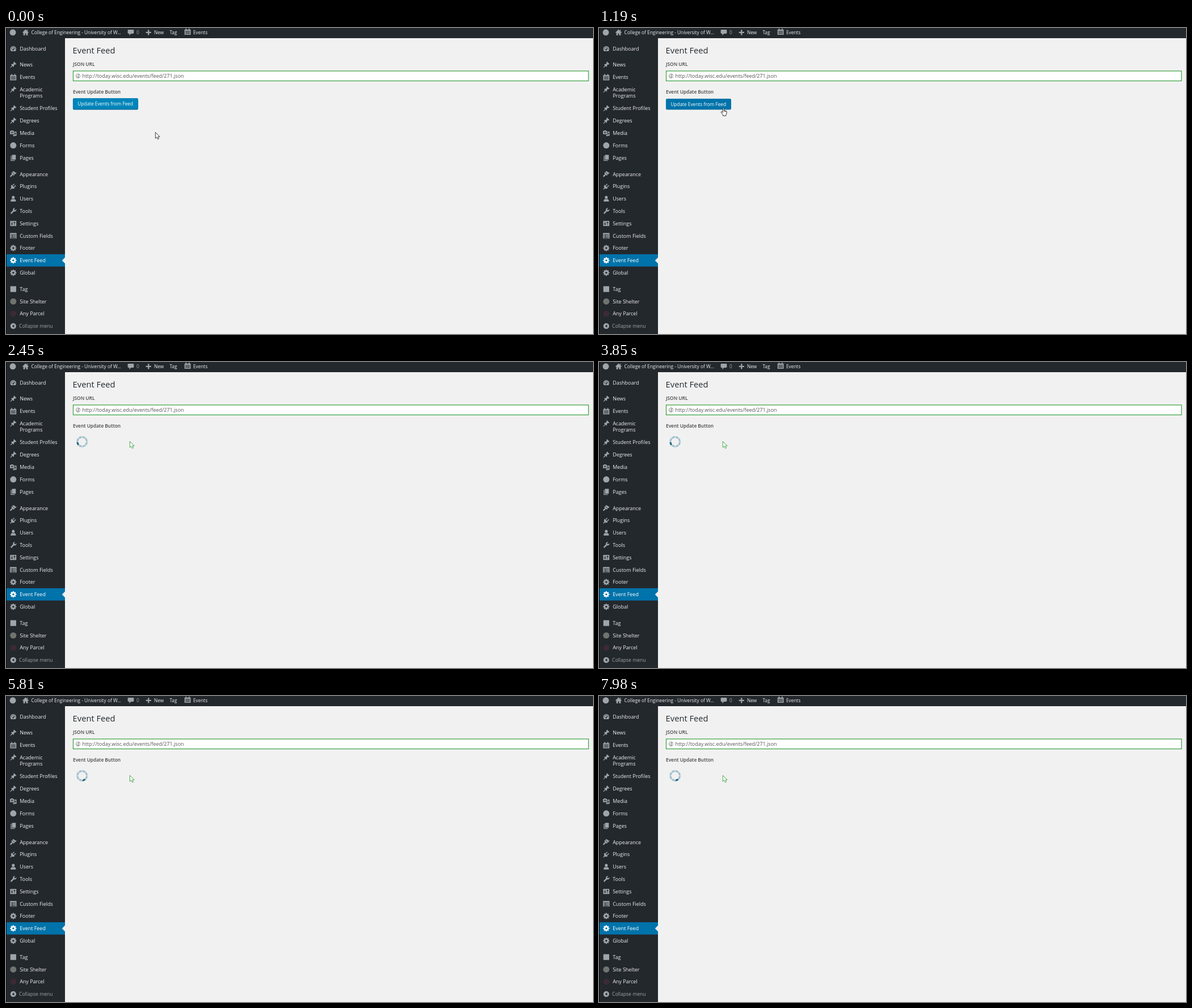
These frames come from a looping animation (1035x541 px, 8 s). An HTML page:

```html
<!DOCTYPE html>
<html lang="en">
<head>
<meta charset="utf-8">
<title>Event Feed</title>
<style>
  html, body { margin: 0; width: 100%; height: 100%; overflow: hidden; background: #f1f1f1; }
  svg { display: block; width: 100vw; height: 100vh; }
  text { font-family: "Open Sans", "Noto Sans", sans-serif; white-space: pre; }
</style>
</head>
<body>
<svg id="stage" viewBox="0 0 1035 541" preserveAspectRatio="none">
  <rect width="1035" height="541" fill="#f1f1f1"/>
  <rect width="104" height="541" fill="#23282d"/>
  <rect width="1035" height="18" fill="#23282d"/>
  <rect width="1" height="541" fill="#0b0d0f"/>
  <rect x="1" y="400" width="103" height="21.7" fill="#0073aa"/>
  <path d="M104 405.8l-5.2 5.2 5.2 5.2z" fill="#f1f1f1"/>
  <g id="bar"></g>
  <g id="menu"></g>
  <g id="form">
    <rect x="118.5" y="76" width="908.5" height="17.5" fill="#fff" stroke="#35a03c" stroke-width="1.2"/>
    <circle cx="127" cy="84.8" r="4.2" fill="#a6a6a6"/>
    <path d="M124.4 82.6l2-1.2 1.2 1-1.4 1.6.6 1.6-1 1.8-1.6-2.4zM128.6 83.4l1.6-.4.4 2.2-1.6 2-.8-1.8z" fill="#f4f4f4"/>
  </g>
  <g id="button">
    <rect id="shadow" x="118" y="125" width="115" height="19.4" rx="2" fill="#006799"/>
    <rect id="face" x="118.4" y="124.9" width="114.2" height="18.6" rx="1.6" stroke-width=".8"/>
  </g>
  <g id="spinner" transform="translate(134.2 141)"></g>
  <path id="arrow" d="M.4.4v10.8l2.5-2.3 1.7 3.8 1.9-.8-1.7-3.7h3.4z" fill="#fff" stroke-width=".9"/>
  <path id="hand" d="M.3 1.6Q1.3-.3 2.4 1.6V5.4L5.6 6Q7.4 6.4 7.2 8.2L6.8 11.4 5.8 12.8V14.6H.6V13.2L-2.6 8.6Q-3 7 -1.4 7.2L.3 8.8zM3.4 7.4V5.8M5.2 7.7V6.2"
    fill="#fff" stroke="#15181b" stroke-width=".9" stroke-linejoin="round"/>
</svg>
<script>
const NS = "http://www.w3.org/2000/svg";
const GREY = "#a0a5aa", DARK = "#23282d", ACTIVE = "#0073aa";
const $ = id => document.getElementById(id);

function add(parent, tag, attrs, content) {
  const el = document.createElementNS(NS, tag);
  for (const k in attrs) el.setAttribute(k, attrs[k]);
  if (content !== undefined) el.textContent = content;
  parent.appendChild(el);
  return el;
}

function label(parent, x, y, size, fill, content, weight = 400) {
  return add(parent, "text", { x, y, "font-size": size, fill, "font-weight": weight }, content);
}

// Icons live in a 20-unit box: f = filled, c = cut out in the background colour, s = stroked.
const f = d => `<path d="${d}" fill="FG"/>`;
const c = d => `<path d="${d}" fill="BG"/>`;
const s = (d, w, col = "FG") => `<path d="${d}" fill="none" stroke="${col}" stroke-width="${w}"/>`;
const dot = (x, y, r, col = "FG") => `<circle cx="${x}" cy="${y}" r="${r}" fill="${col}"/>`;

function gearTeeth() {
  let d = "";
  for (let i = 0; i < 8; i++) {
    const a = i * Math.PI / 4;
    d += `M10 10L${(10 + 8.6 * Math.cos(a)).toFixed(2)} ${(10 + 8.6 * Math.sin(a)).toFixed(2)}`;
  }
  return d;
}

const icons = {
  gauge: f("M3.8 17h12.4c1.2-1.6 1.9-3.3 1.9-5.7a8.1 8.1 0 0 0-16.2 0c0 2.4.7 4.1 1.9 5.7z") +
    s("M9.6 13.6L13.6 7", 1.8, "BG") + dot(9.6, 13.4, 1.9, "BG") + dot(5, 11, 1.1, "BG") +
    dot(6.6, 7.4, 1.1, "BG") + dot(10, 5.6, 1.1, "BG") + dot(15.2, 11, 1.1, "BG"),
  pin: f("M10.4 3l1.8-1.8 6.4 6.3-1.8 1.9c-1.1-.7-2.5-.6-3.4.3l-.8.8c-.9.9-1 2.3-.3 3.4l-1.9 1.8-2.4-2.4-2.8 2.8c-.4.4-3.4 2.7-3.8 2.3s1.9-3.4 2.3-3.8l2.8-2.8L4.1 9.4l1.8-1.9c1.1.7 2.5.6 3.4-.3l.8-.8c.9-.9 1-2.3.3-3.4z"),
  calendar: f("M1.5 4h17v14.5h-17zM4.6 1h2.4v3H4.6zM13 1h2.4v3H13z") +
    s("M3.2 8.4h13.6M3.2 11.7h13.6M3.2 15h13.6M6.4 7.5v9.4M10 7.5v9.4M13.6 7.5v9.4", 1, "BG"),
  media: f("M1 4.2h2.6L4.6 2.6h4l1 1.6h2.6V13H1z") + dot(6.6, 8.2, 2.7, "BG") + dot(6.6, 8.2, 1.2) +
    f("M13.6 6H19v10.6h-2V9h-2.6v8h-2z") + dot(11.8, 16.6, 2.3) + dot(16.6, 16, 2.3),
  pages: f("M6.4 2H17v13.4H6.4zM3 4.8h2v12.2h9.4v1.8H3z"),
  brush: f("M14.5 11.1L7.4 4l1.5-1.5c.5-.6 2.3-.5 3.5.3s1.4 1.3 2.9 2.1c1.2.6 2.5 1.3 4.5.9zM13.8 11.8L6.7 4.7 4.9 6.5c-.4.4-.4 1 0 1.4L6 8.9c.4.4.4 1 0 1.5-.6.6-1.4 1.1-2.2 1.7C2 13.4.4 16 1.4 17.1s3.6-.5 5-2.4c.6-.8 1.1-1.6 1.7-2.2.4-.4 1-.4 1.4 0l1.1 1c.4.4 1 .4 1.4 0z"),
  plug: f("M5.4 5.6l9 9c-2.2 1.8-5 2.2-7.4 1.2L4.2 13c-1-2.4-.6-5.2 1.2-7.4z") +
    s("M8.4 7.4l4.4-4.4M12.6 11.6L17 7.2M6 14l-4 4", 2.3),
  user: dot(10, 6, 4) + f("M2.6 17.6c0-4.4 2-6.8 4.6-7.2 1.6 1.2 4 1.2 5.6 0 2.6.4 4.6 2.8 4.6 7.2z"),
  wrench: s("M3.2 16.8l9-9", 3.8) + dot(13.8, 6.2, 4.8) + c("M13 7l-.4-3L17 0l3 3-4 4.4z") + dot(3.6, 16.4, .8, "BG"),
  sliders: f("M1.6 3h16.8v14.2H1.6z") + s("M6.6 4.8v10.6M13.4 4.8v10.6", 1.2, "BG") +
    c("M4.4 10h4.4v2.6H4.4zM11.2 6.6h4.4v2.6h-4.4z"),
  table: f("M1 2.4h18v15.4H1z") + c("M2.6 6.2h14.8v1.4H2.6z") +
    s("M2.6 10.6h14.8M2.6 14h14.8M8 7.4v9M3 16.4h14", 1.2, "BG"),
  gear: s(gearTeeth(), 3.4) + dot(10, 10, 6.4) + dot(10, 10, 2.7, "BG"),
  back: dot(10, 10, 8) + c("M12.4 5.8v8.4L6.6 10z"),
  house: f("M10 1.8l8.6 8.2-1.3 1.4L16 10.2V18h-4.4v-5H8.4v5H4v-7.8l-1.3 1.2L1.4 10zM14 2.6h2v4l-2-2z"),
  bubble: f("M3.4 2.4h13.2q1.8 0 1.8 1.8v7.4q0 1.8-1.8 1.8h-6L6 18.4v-5H3.4q-1.8 0-1.8-1.8V4.2q0-1.8 1.8-1.8z"),
  plus: s("M10 2.8v14.4M2.8 10h14.4", 3.6),
  disc: dot(10, 10, 8.6),
  tile: f("M2 2h16v16H2z")
};

function icon(parent, name, x, y, fg = GREY, bg = DARK) {
  const g = add(parent, "g", { transform: `translate(${x - 6.4} ${y - 6.4}) scale(.64)` });
  g.innerHTML = icons[name].replace(/FG/g, fg).replace(/BG/g, bg);
}

const bar = $("bar");
icon(bar, "disc", 12, 7.8);
[["house", 34.5], ["bubble", 220], ["plus", 251.3], ["calendar", 320.2]]
  .forEach(([name, x]) => icon(bar, name, x, name === "calendar" ? 6.6 : 7.8));
[["College of Engineering - University of W...", 44.6], ["New", 261], ["Tag", 288.4], ["Events", 330]]
  .forEach(([t, x]) => label(bar, x, 10.9, 8.32, "#eee", t));
label(bar, 230, 10.9, 8.32, GREY, "0");

const menu = $("menu");
const groups = [
  [36.4, ["gauge", "Dashboard"]],
  [65.2, ["pin", "News"], ["calendar", "Events"], ["pin", "Academic\nPrograms"]],
  [142.2, ["pin", "Student Profiles"], ["pin", "Degrees"], ["media", "Media"], ["disc", "Forms"], ["pages", "Pages"]],
  [258.4, ["brush", "Appearance"], ["plug", "Plugins"], ["user", "Users"], ["wrench", "Tools"],
    ["sliders", "Settings"], ["table", "Custom Fields"], ["gear", "Footer"], ["gear", "Event Feed"], ["gear", "Global"]],
  [461.6, ["tile", "Tag"], ["disc", "Site Shelter", "#70736f"], ["disc", "Any Parcel", "#3b2a34"], ["back", "Collapse menu"]]
];
for (const [top, ...items] of groups) {
  items.forEach(([name, title, tint], i) => {
    const y = top + i * 21.78;
    const on = title === "Event Feed", last = name === "back";
    icon(menu, name, 12.8, y, on ? "#fff" : tint || GREY, on ? ACTIVE : DARK);
    title.split("\n").forEach((line, j) =>
      label(menu, last ? 23 : 24.2, y + 3.2 + j * 11.4, last ? 8.6 : 8.98, on ? "#fff" : last ? GREY : "#eee", line));
  });
}

const form = $("form");
label(form, 117.6, 45, 14.72, "#23282d", "Event Feed");
label(form, 118, 66.6, 8.35, "#444", "JSON URL", 600);
label(form, 134.4, 88.1, 8.98, "#555", "http://today.wisc.edu/events/feed/271.json");
label(form, 118, 115.5, 8.35, "#444", "Event Update Button", 600);
const caption = label($("button"), 126.2, 137, 8.32, "#fff", "Update Events from Feed");

const segments = Array.from({ length: 8 }, (_, i) => add($("spinner"), "path", {
  d: "M.5 -9.9A9.9 9.9 0 0 1 6.65 -7.35L4.4 -5.1A6.7 6.7 0 0 0 .5 -6.7z",
  transform: `rotate(${i * 45})`
}));

const LOOP = 8000, TICK = 70, MOVE = 490, ARRIVE = 1120, PRESS = 1190, LOAD = 1260;
const show = (el, on) => el.setAttribute("visibility", on ? "visible" : "hidden");
const mix = (a, b, k) => a + (b - a) * k;

function draw(ms) {
  const t = Math.floor(ms / TICK) * TICK;
  const loading = t >= LOAD, pressed = t >= PRESS;

  const p = Math.min(1, Math.max(0, (t - MOVE + TICK) / (ARRIVE - MOVE + TICK)));
  const k = p * p * (3 - 2 * p);
  const x = mix(263, 218, k), y = mix(184, 140, k);
  const hover = !loading && x < 233 && y < 144;

  show($("arrow"), !hover);
  show($("hand"), hover);
  $("arrow").setAttribute("transform", `translate(${x} ${y})`);
  $("arrow").setAttribute("stroke", loading ? "#35a03c" : "#25282b");
  $("hand").setAttribute("transform", `translate(${x} ${y + .6})`);

  show($("button"), !loading);
  show($("shadow"), !loading && !pressed);
  $("face").setAttribute("fill", pressed ? ACTIVE : hover ? "#008ec2" : "#0085ba");
  $("face").setAttribute("stroke", pressed ? "#006799" : "#0073aa");
  $("face").setAttribute("y", pressed ? 125.4 : 124.5);
  caption.setAttribute("y", pressed ? 137.7 : 137);

  show($("spinner"), loading);
  // The spinner is slower than the picture rate, so it rests for 9 ticks in every 41.
  const n = (t - LOAD) / TICK;
  const lit = (n - Math.floor((n + 3.05) * 9 / 41)) % 8;
  segments.forEach((seg, i) => seg.setAttribute("fill", i === lit ? "#23687f" : "#a0c0cd"));
}

const start = performance.now();
function frame() {
  draw((performance.now() - start) % LOOP);
  requestAnimationFrame(frame);
}
frame();
</script>
</body>
</html>
```
